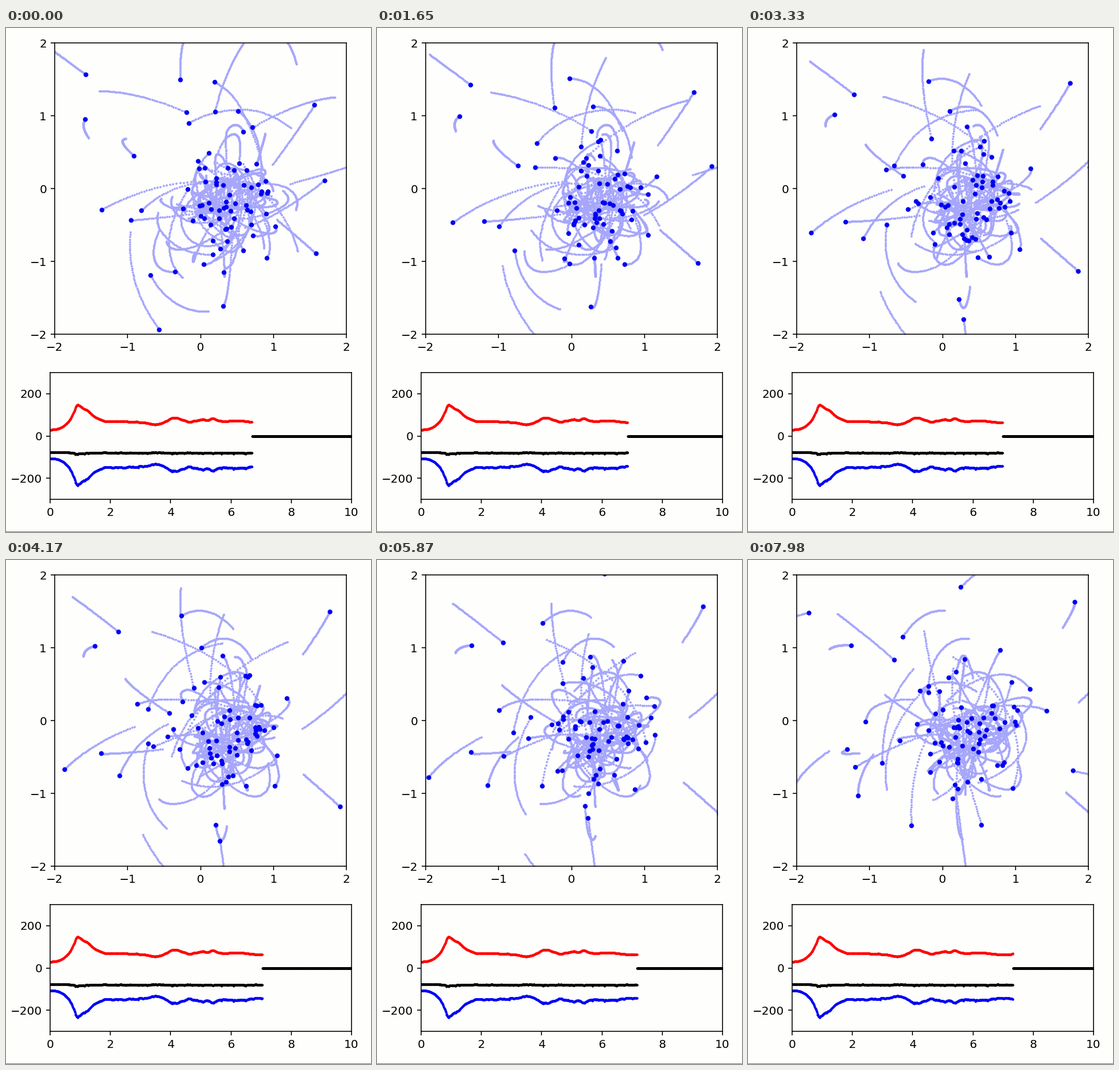
Write a matplotlib script that moves like this. It is 637x879 px and loops after 8000 ms.

```python
import numpy as np
import matplotlib.pyplot as plt
from matplotlib.animation import FuncAnimation

W, H, DPI = 637, 879, 144
LOOP, INTERVAL = 8000, 40
BG, TRAIL, BLUE = "#fefefd", "#a6a6fb", "#0000f2"

# gravity simulation
N, DT, T_END, SOFT, TAIL = 100, 0.01, 10, 0.1, 50
START, SPAN = 670, 62
# playback: clock time (ms) -> steps since START
CLOCK = [0, 1070, 2350, 3330, 4890, 5870, 7980]
STEPS = [0, 11, 20, 28, 39, 46, SPAN]


def separations(pos):
    x, y, z = pos[:, 0:1], pos[:, 1:2], pos[:, 2:3]
    return x.T - x, y.T - y, z.T - z


def acceleration(pos, mass):
    dx, dy, dz = separations(pos)
    inv_r3 = (dx**2 + dy**2 + dz**2 + SOFT**2) ** -1.5
    return np.hstack([(d * inv_r3) @ mass for d in (dx, dy, dz)])


def energy(pos, vel, mass):
    dx, dy, dz = separations(pos)
    r = np.sqrt(dx**2 + dy**2 + dz**2)
    upper = np.triu_indices(N, 1)
    kinetic = 0.5 * np.sum(mass * vel**2)
    potential = -np.sum((mass * mass.T)[upper] / r[upper])
    return kinetic, potential


def simulate(count):
    np.random.seed(17)
    mass = 20.0 * np.ones((N, 1)) / N
    pos = np.random.randn(N, 3)
    vel = np.random.randn(N, 3)
    vel -= np.mean(mass * vel, 0) / np.mean(mass)
    acc = acceleration(pos, mass)
    path = [pos[:, :2].copy()]
    levels = [energy(pos, vel, mass)]
    for _ in range(count):
        vel += acc * DT / 2.0
        pos += vel * DT
        acc = acceleration(pos, mass)
        vel += acc * DT / 2.0
        path.append(pos[:, :2].copy())
        levels.append(energy(pos, vel, mass))
    return np.array(path), np.array(levels)


path, levels = simulate(START + SPAN)
times = np.arange(int(T_END / DT) + 1) * DT

fig = plt.figure(figsize=(W / DPI, H / DPI), dpi=DPI, facecolor=BG)


def panel(left, top, right, bottom, xlim, ylim, xticks, yticks):
    box = [left / W, 1 - bottom / H, (right - left) / W, (bottom - top) / H]
    ax = fig.add_axes(box, facecolor=BG)
    ax.set(xlim=xlim, ylim=ylim, xticks=xticks, yticks=yticks)
    return ax


ax1 = panel(85, 26, 594, 534, (-2, 2), (-2, 2), range(-2, 3), range(-2, 3))
ax2 = panel(77, 601, 603, 822, (0, T_END), (-300, 300),
            range(0, 11, 2), (-200, 0, 200))
fig.add_artist(plt.Rectangle((0, 0), 1, 1 / H, fc="#7d7d66", lw=0,
                             antialiased=False))

trails = ax1.scatter([], [], s=1, color=TRAIL)
bodies = ax1.scatter([], [], s=10, color=BLUE)
curves = [ax2.scatter([], [], s=1, color=c) for c in ("red", BLUE, "black")]


def update(frame):
    done = np.interp(frame * INTERVAL, CLOCK, STEPS)
    now = START + int(done + 0.5)
    trails.set_offsets(path[now - 1 - TAIL:now].reshape(-1, 2))
    bodies.set_offsets(path[now])

    # energies not yet computed stay at zero
    shown = np.zeros((len(times), 3))
    shown[:now + 1, :2] = levels[:now + 1]
    shown[:, 2] = shown[:, 0] + shown[:, 1]
    for curve, values in zip(curves, shown.T):
        curve.set_offsets(np.column_stack([times, values]))
    return [trails, bodies, *curves]


anim = FuncAnimation(fig, update, frames=LOOP // INTERVAL, interval=INTERVAL,
                     repeat=True, repeat_delay=0, blit=False)
plt.show()
```
